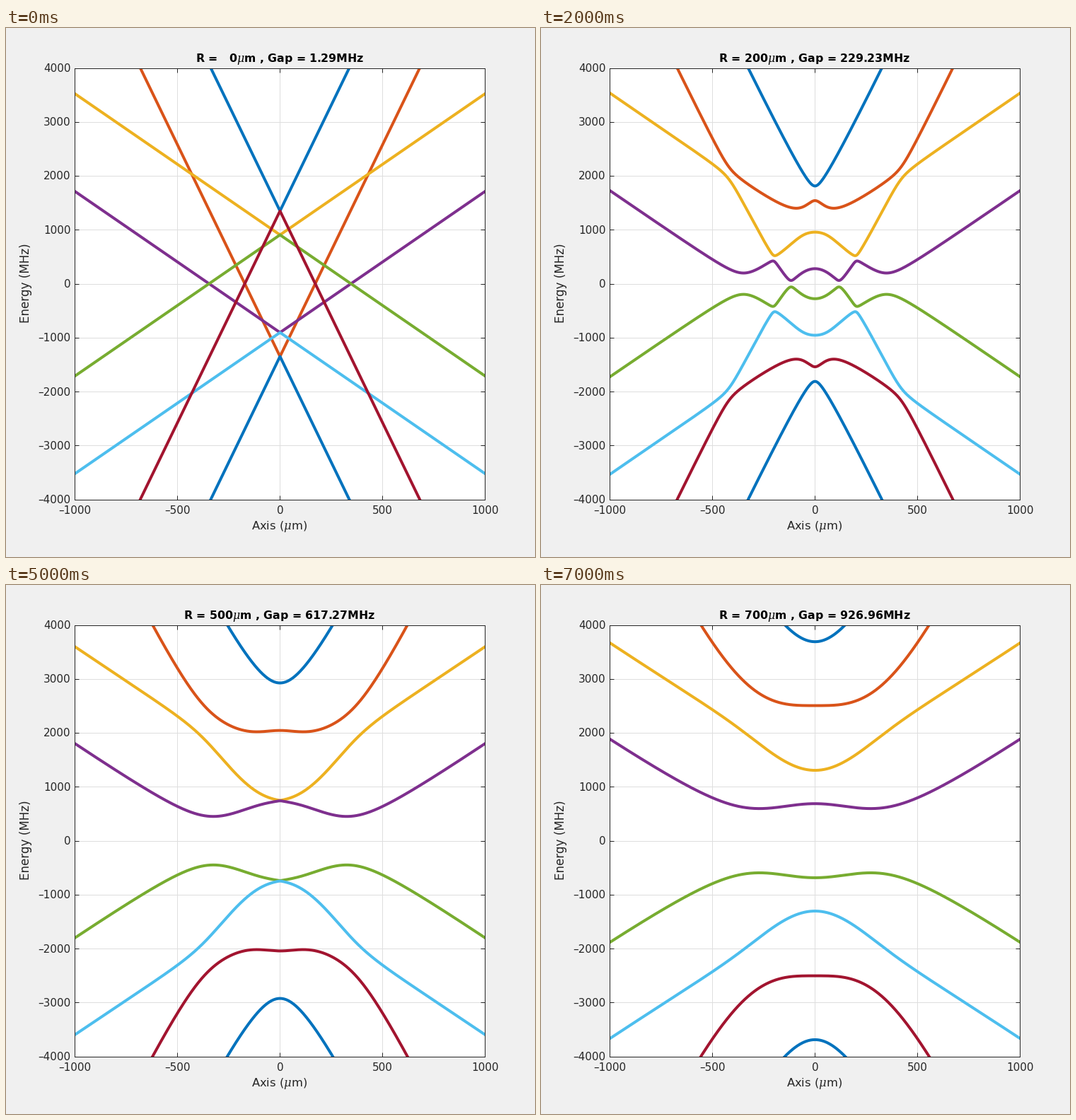
A matplotlib script that plays this animation: 748 px wide and 748 px high, repeating every 8 s.

```python
import numpy as np
import matplotlib.pyplot as plt
from matplotlib.animation import FuncAnimation

SIZE, DPI = 748, 100
PX = 72 / DPI  # points per pixel
# just inside pixel centres, so the frame snaps to whole pixels
LEFT, RIGHT, TOP, BOTTOM = 97.45, 677.45, 56.55, 666.55
INK = "#262626"
COLORS = ["#0072BD", "#D95319", "#EDB120", "#7E2F8E",
          "#77AC30", "#4DBEEE", "#A2142F", "#0072BD"]

# Spin 3/2 with a two-level splitting, in MHz and micrometres
ZEEMAN = 5.235
HALF_SPLIT = 833.5
STARK = 707.2
GAPS = [1.29, 113.38, 229.23, 350.15, 478.75, 617.27, 766.88, 926.96]

axis = np.linspace(-1000, 1000, 1001)
half = np.sqrt(3) / 2
one = np.eye(2)
tau_x = np.array([[0, 1], [1, 0]])
tau_z = np.diag([1, -1])
spin_z = np.diag([1.5, 0.5, -0.5, -1.5])
spin_x = np.diag([half, 1, half], 1) + np.diag([half, 1, half], -1)

along = ZEEMAN * np.kron(spin_z, one)
across = ZEEMAN / 2 * np.kron(spin_x / 1, one)
static = HALF_SPLIT * np.kron(np.eye(4), tau_z) + STARK * np.kron(spin_z, tau_x)


def levels(radius):
    """Eight energy curves along the axis, one per row."""
    if radius == 0:
        # uncoupled: straight branches that cross
        ramp = ZEEMAN / 2 * np.abs(axis)
        outer = np.hypot(HALF_SPLIT, 1.5 * STARK)
        inner = np.hypot(HALF_SPLIT, 0.5 * STARK)
        return np.array([outer + 3 * ramp, -outer + 3 * ramp,
                         inner + ramp, -inner + ramp,
                         inner - ramp, -inner - ramp,
                         outer - 3 * ramp, -outer - 3 * ramp])
    h = static + radius * across + axis[:, None, None] * along
    return np.linalg.eigvalsh(h)[:, ::-1].T


plt.rcParams["font.family"] = "DejaVu Sans"
plt.rcParams["mathtext.fontset"] = "dejavuserif"

fig = plt.figure(figsize=(SIZE / DPI, SIZE / DPI), dpi=DPI, facecolor="#F0F0F0")
ax = fig.add_axes([LEFT / SIZE, 1 - BOTTOM / SIZE,
                   (RIGHT - LEFT) / SIZE, (BOTTOM - TOP) / SIZE])
ax.set(xlim=(-1000, 1000), ylim=(-4000, 4000))
ax.set_xticks(range(-1000, 1001, 500))
ax.set_yticks(range(-4000, 4001, 1000))
ax.set_axisbelow(True)
ax.grid(color="#DEDEDE", linewidth=PX)
ax.tick_params(direction="in", length=6 * PX, width=PX, color=INK,
               top=True, right=True, labelbottom=False, labelleft=False)
for spine in ax.spines.values():
    spine.set(color=INK, linewidth=PX)


def label(x, y, text, size, ha="center", color=INK, **style):
    """Text with its baseline at pixel (x, y) from the top left."""
    return fig.text(x / SIZE, 1 - y / SIZE, text, fontsize=size * PX, ha=ha,
                    va="baseline", color=color, rotation_mode="anchor", **style)


def number(value):
    return str(value).replace("-", "\u2013")


for tick in range(-1000, 1001, 500):
    label(387.5 + tick * 0.29, 687, number(tick), 15.2)
for tick in range(-4000, 4001, 1000):
    label(91.5, 367 - tick * 0.07625, number(tick), 15.2, ha="right")
label(387, 709, r"Axis ($\mu$m)", 16.4)
label(33, 360.5, "Energy (MHz)", 16.7, rotation=90)
title = label(386.6, 48.5, "", 15.7, color="black", weight="bold")

curves = [ax.plot([], [], color=c, linewidth=4 * PX)[0] for c in COLORS]


def draw(step):
    radius = 100 * step
    for curve, energy in zip(curves, levels(radius)):
        curve.set_data(axis, energy)
    title.set_text(rf"R = {radius:3d}$\mu$m , Gap = {GAPS[step]:.2f}MHz")
    return curves + [title]


anim = FuncAnimation(fig, draw, frames=len(GAPS), interval=1000,
                     repeat=True, repeat_delay=0)
plt.show()
```
